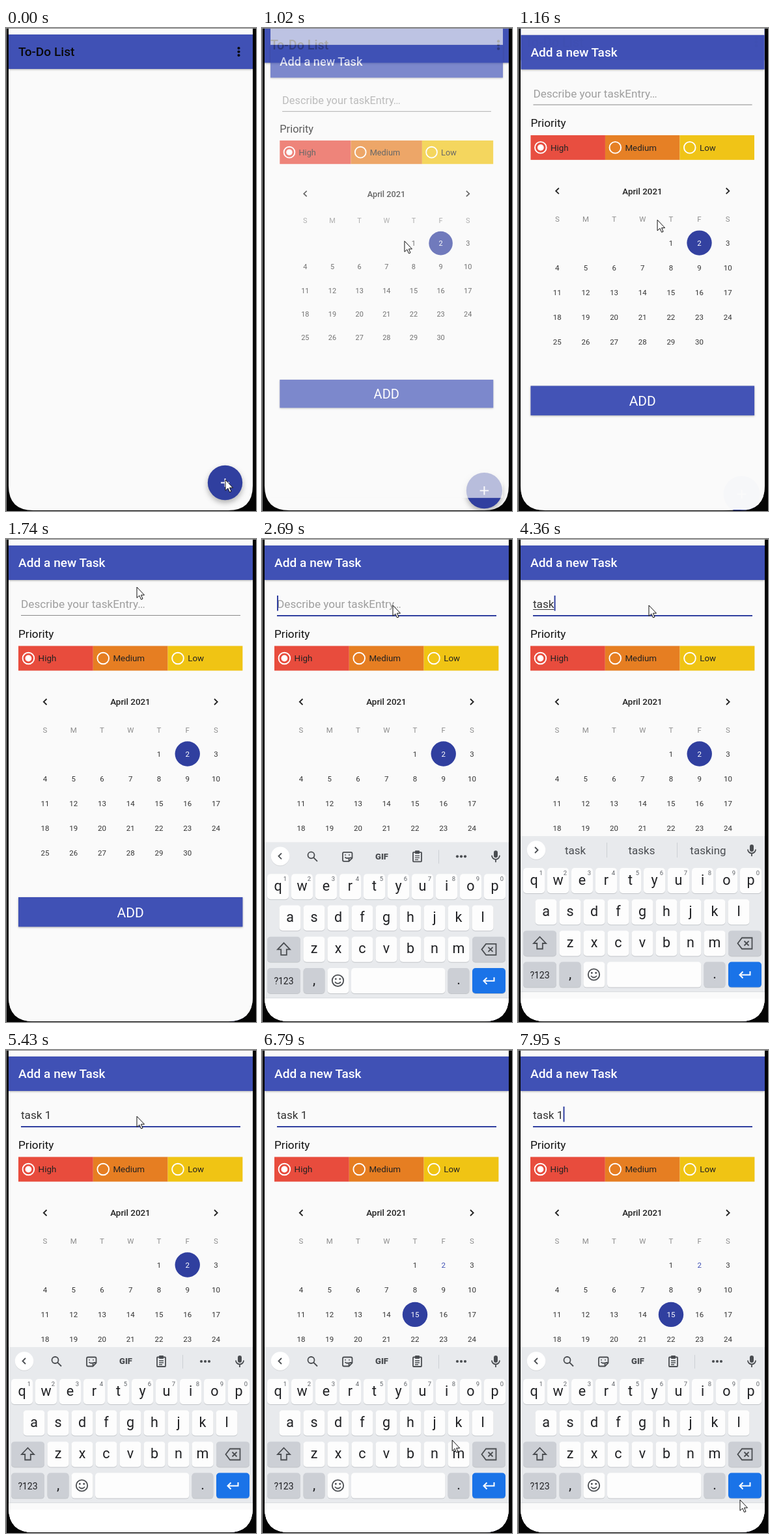
Animation, 384 px wide and 743 px high, one loop 8 s. Source, as an HTML page:

```html
<!DOCTYPE html>
<html lang="en">
<head>
<meta charset="utf-8">
<title>To-Do List</title>
<style>
  html, body { margin: 0; width: 100%; height: 100%; overflow: hidden; background: #000; }
  svg { display: block; width: 100%; height: 100%; }
  text { font-family: Roboto, sans-serif; white-space: pre; }
  .medium { font-weight: 500; }
  .mid { text-anchor: middle; }
  .raised { filter: drop-shadow(0 1.5px 1.5px rgba(0, 0, 0, .3)); }
  .fab { filter: drop-shadow(0 4px 4px rgba(0, 0, 0, .3)); }
  .line { fill: none; stroke: #4a4d51; stroke-width: 1.8; }
</style>
</head>
<body>
<svg id="stage" viewBox="0 0 384 743"></svg>
<script>
const LOOP = 8000;
const PRIMARY = '#4051b5', DARK = '#303f9f', PAGE = '#fafafa', ICON = '#4a4d51';

// Markup helpers
const text = (x, y, size, str, attrs = '') =>
  `<text x="${x}" y="${y}" font-size="${size}" ${attrs}>${str}</text>`;
const rect = (x, y, w, h, fill, attrs = '') =>
  `<rect x="${x}" y="${y}" width="${w}" height="${h}" fill="${fill}" ${attrs}/>`;
const circle = (x, y, r, fill, attrs = '') =>
  `<circle cx="${x}" cy="${y}" r="${r}" fill="${fill}" ${attrs}/>`;
const path = (d, attrs = 'class="line"') => `<path d="${d}" ${attrs}/>`;
const appBar = (title, color) =>
  rect(4, -60, 375, 802, PAGE) +
  rect(4, 10, 375, 53, PRIMARY, 'class="raised"') +
  text(19, 43.3, 19.1, title, `class="medium" fill="${color}"`);

function listScreen() {
  return appBar('To-Do List', '#0a0a0a') +
    [31, 36.5, 42].map(y => circle(357.5, y, 2.1, '#0a0a0a')).join('') +
    circle(336.5, 699.5, 26.7, DARK, 'class="fab"') +
    path('M330 699.5h13M336.5 693v13', 'stroke="#fff" stroke-width="1.9"');
}

function priorities() {
  return [['High', '#e84c3d'], ['Medium', '#e67e22'], ['Low', '#f0c414']].map(([name, color], i) => {
    const x = 19 + i * 114.8;
    return rect(x, 164.5, 114.8, 38, color) +
      circle(x + 15.4, 183.5, 8.8, 'none', 'stroke="#fff" stroke-width="1.9"') +
      (i ? '' : circle(x + 15.4, 183.5, 4.9, '#fff')) +
      text(x + 30.6, 188.4, 13.4, name, 'fill="#222"');
  }).join('');
}

const columnX = c => 60 + c * 43.75;
const rowY = r => 330.5 + r * 38.2;
const dayCell = day => [columnX((day + 3) % 7), rowY(Math.floor((day + 3) / 7))];

function calendar() {
  let out = path('M62.5 246l-4.7 4.5 4.7 4.5M320 246l4.7 4.5-4.7 4.5', 'fill="none" stroke="#222" stroke-width="1.8"') +
    text(191, 255.3, 13.4, 'April 2021', 'class="medium mid" fill="#222"') +
    [...'SMTWTFS'].map((d, c) => text(columnX(c), 298, 11.5, d, 'class="mid" fill="#8c8c8c"')).join('') +
    circle(0, 0, 19.2, DARK, 'id="selected"');
  for (let day = 1; day <= 30; day++) {
    const [x, y] = dayCell(day);
    out += text(x, y + 4.1, 11.5, day, `id="day${day}" class="mid" fill="#333"`);
  }
  return out;
}

function taskScreen() {
  return appBar('Add a new Task', '#fff') +
    text(23, 106, 17.2, 'Describe your taskEntry…', 'id="hint" fill="#9e9e9e"') +
    text(23, 106, 17.2, '', 'id="entry" fill="#333"') +
    rect(23, 108, 0, 1, '#333', 'id="composing"') +
    rect(23, 117, 337, 1, '#888', 'id="underline"') +
    rect(23, 87, 2, 23.5, DARK, 'id="caret"') +
    text(19, 152, 17.2, 'Priority', 'fill="#111"') +
    priorities() + calendar() +
    rect(19, 551, 344.5, 45.5, PRIMARY, 'class="raised"') +
    text(191.2, 581.7, 21, 'ADD', 'class="mid" fill="#fff"');
}

function key(x, row, w, label = '', fill = '#fdfdfd', size = 21.5) {
  const y = 506 + row * 48.2;
  return rect(x, y + 1, w, 39, '#c3c6ca', 'rx="5"') + rect(x, y, w, 39, fill, 'rx="5"') +
    text(x + w / 2, y + (size > 20 ? 25.5 : 25), size, label, 'class="mid" fill="#202124"');
}

function letters(chars, x, row) {
  return [...chars].map((c, i) => key(x + i * 37, row, 33, c) +
    (row ? '' : text(x + i * 37 + 27.5, 516.5, 9.5, (i + 1) % 10, 'class="mid" fill="#5f6368"'))).join('');
}

function toolbar() {
  return circle(75.5, 477, 5, 'none', 'class="line"') + path('M79 480.5l6 6') +
    path('M126 472.5h10.5q2 0 2 2v7l-5 5H126q-2 0-2-2v-10q0-2 2-2zM138.5 481h-3q-2 0-2 2v3M127.5 480q2.5 3 5.5 1M128 476v1.5M134 476v1.5') +
    text(184, 483.3, 13, 'GIF', `class="mid" font-weight="900" fill="${ICON}"`) +
    rect(232, 472.5, 13, 14.5, 'none', 'class="line" rx="1"') + rect(235, 470, 7, 5, ICON, 'rx="1"') +
    path('M235 478h7M235 481h7M235 484h5', `stroke="${ICON}" stroke-width="1.3"`) +
    rect(271, 469, 1, 21, '#cdd0d4') +
    [300, 306, 312].map(x => circle(x, 479, 2.1, ICON)).join('');
}

function keyboard() {
  const special = '#cccfd5';
  return rect(4, 457, 375, 240, '#e8eaed') + rect(4, 696, 375, 1, '#dadce0') +
    circle(28, 479.5, 14.3, '#d5d7da') + circle(28, 478.5, 14.3, '#fff') +
    path('M30 474l-4.5 4.5 4.5 4.5', 'id="chevron" class="line"') +
    `<g id="toolbar">${toolbar()}</g><g id="suggestions">` +
    [88, 190, 292].map(x => text(x, 485.3, 17, '', 'class="mid" fill="#4a4d51"')).join('') +
    rect(136, 467, 1, 23, '#cdd0d4') + rect(244, 467, 1, 23, '#cdd0d4') + '</g>' +
    rect(356, 470, 6, 11, ICON, 'rx="3"') + path('M353 477.5a6 6 0 0 0 12 0M359 484v4') +
    letters('qwertyuiop', 8, 0) + letters('asdfghjkl', 26.5, 1) + letters('zxcvbnm', 63.5, 2) +
    key(8, 2, 51, '', special) + path('M33.5 612l9.5 10h-5.2v8.500h-8.600v-8.500h-5.200z') +
    key(323, 2, 51, '', special) +
    path('M337.500 622l6.500-8.500h15.500v17H344zM347.500 618.500l7 7m0-7l-7 7') +
    key(8, 3, 51, '?123', special, 14) + key(63.5, 3, 33, ',', special) +
    key(100.5, 3, 33) + circle(116.5, 670, 8.7, 'none', 'class="line"') +
    circle(113.3, 667.5, 1.4, ICON) + circle(119.7, 667.5, 1.4, ICON) + path('M112 672q4.500 5 9 0') +
    key(137, 3, 144.5) + key(285.5, 3, 33, '.', special) +
    key(323, 3, 51, '', '#1a73e8') +
    path('M356.500 665v5.500h-16m5-5l-5 5 5 5', 'fill="none" stroke="#fff" stroke-width="2"');
}

const stage = document.getElementById('stage');
stage.innerHTML = `
  <clipPath id="glass"><path d="M4 1H379V704Q379 742 341 742H42Q4 742 4 704Z"/></clipPath>
  ${rect(0, 0, 384, 743, '#050505')}${rect(0, 0, 1, 743, '#8a8a8a')}${rect(0, 0, 384, 1, '#8a8a8a')}
  <g clip-path="url(#glass)">
    <g id="list">${listScreen()}</g>
    <g id="task">${taskScreen()}</g>
    <g id="keys"><g id="slide">${keyboard()}</g>${rect(4, 707, 375, 36, '#fff')}</g>
  </g>
  ${path('M0 0V16.500L3.900 13 6.500 19 9 18 6.500 12.200H11.500Z', 'id="pointer" fill="#fff" stroke="#111" stroke-width="1"')}`;

const ui = {};
stage.querySelectorAll('[id]').forEach(el => ui[el.id] = el);
const set = (el, attrs) => { for (const name in attrs) el.setAttribute(name, attrs[name]); };
const show = (el, visible) => set(el, { visibility: visible ? 'visible' : 'hidden' });

// [time, x, y]
const POINTER = [
  [0, 337, 695], [560, 337, 695], [1020, 219, 328], [1450, 204, 228], [1590, 202, 130], [1740, 201, 74],
  [1850, 201, 74], [2100, 201, 102], [5800, 201, 102], [6200, 233, 400], [6420, 233, 400],
  [6790, 292, 600], [7150, 353, 672], [7500, 341, 692], [LOOP, 341, 692]
];
// [time, entry, suggestions]
const TYPING = [
  [0, '', ''], [3180, 't', 't the to'], [3400, 'ta', 'ta take talk'], [3935, 'tas', 'tas task tasks'],
  [4180, 'task', 'task tasks tasking'], [4600, 'task ', 'is for list'],
  [5055, 'task 1', 'is for list'], [5200, 'task 1', '']
];
const CARET_ON = [[2270, 2800], [3180, 5400], [5860, 6380], [6900, 7420], [7930, LOOP]];
const FOCUS = 2270, SELECT = 6400;

const clamp = v => Math.min(1, Math.max(0, v));
const easeOut = (v, power) => 1 - (1 - clamp(v)) ** power;
const zoom = (el, s) => set(el, { transform: `translate(192 343) scale(${s}) translate(-192 -343)` });

function pointerAt(t) {
  const i = Math.max(1, POINTER.findIndex(p => p[0] >= t));
  const [t0, x0, y0] = POINTER[i - 1], [t1, x1, y1] = POINTER[i];
  const k = (t - t0) / (t1 - t0);
  return [x0 + (x1 - x0) * k, y0 + (y1 - y0) * k];
}

function drawEntry(t) {
  const [, entry, words] = TYPING.findLast(step => step[0] <= t);
  ui.entry.textContent = entry;
  const width = entry ? ui.entry.getComputedTextLength() : 0;
  show(ui.hint, !entry);
  set(ui.composing, { width: /^[a-z]+$/.test(entry) ? width : 0 });
  set(ui.caret, { x: 23 + width });
  show(ui.caret, CARET_ON.some(([on, off]) => t >= on && t < off));
  set(ui.underline, t < FOCUS ? { height: 1, fill: '#888' } : { height: 2, fill: DARK });

  show(ui.toolbar, !words);
  show(ui.suggestions, words);
  words.split(' ').forEach((word, i) => ui.suggestions.children[i].textContent = word);
  set(ui.chevron, { transform: words ? 'matrix(-1 0 0 1 56 0)' : '' });
}

function draw(t) {
  const open = easeOut((t - 882) / 320, 2);
  zoom(ui.list, 1 + .05 * open);
  zoom(ui.task, .85 + .15 * open);
  set(ui.task, { opacity: open });

  drawEntry(t);
  const rise = easeOut((t - 2555) / 200, 3);
  set(ui.keys, { display: rise > 0 ? 'inline' : 'none' });
  set(ui.slide, { transform: `translate(0 ${285 * (1 - rise)})` });

  const picked = t >= SELECT;
  const [x, y] = dayCell(picked ? 15 : 2);
  set(ui.selected, { cx: x, cy: y });
  set(ui.day2, { fill: picked ? PRIMARY : '#fff' });
  set(ui.day15, { fill: picked ? '#fff' : '#333' });

  set(ui.pointer, { transform: `translate(${pointerAt(t)})` });
}

const start = performance.now();
function tick() {
  draw((performance.now() - start) % LOOP);
  requestAnimationFrame(tick);
}
tick();
</script>
</body>
</html>
```
